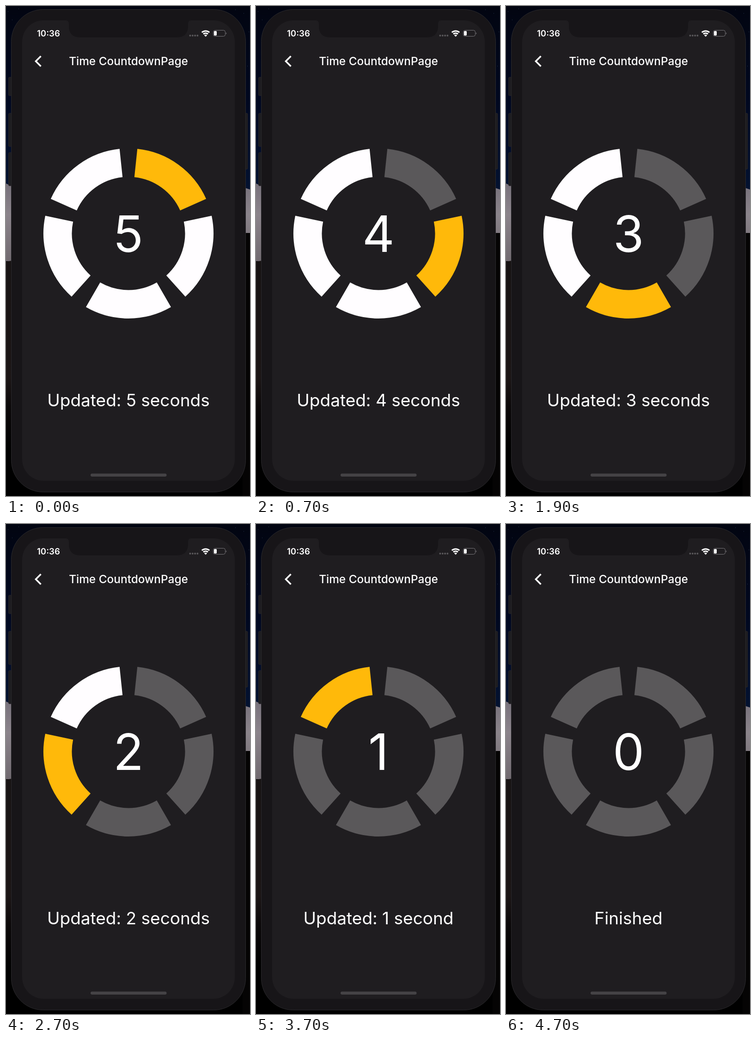
An HTML page that plays this animation: 528 px wide and 1060 px high, repeating every 5.7 s.

```html
<!DOCTYPE html>
<html lang="en">
<head>
<meta charset="utf-8">
<title>Countdown</title>
<style>
  html, body { margin: 0; width: 100%; height: 100%; overflow: hidden; background: #000; }
  svg { display: block; width: 528px; height: 1060px; }
  text { font-family: Inter, Roboto, sans-serif; fill: #fff; }
  .mid { text-anchor: middle; }
</style>
</head>
<body>
<svg viewBox="0 0 528 1060">
  <defs>
    <linearGradient id="sky" x2="0" y2="1">
      <stop stop-color="#020511"/><stop offset=".5" stop-color="#010820"/><stop offset="1" stop-color="#031231"/>
    </linearGradient>
    <linearGradient id="hill" x2="0" y2="1">
      <stop stop-color="#77717b"/><stop offset=".4" stop-color="#8b848b"/><stop offset="1" stop-color="#716a70"/>
    </linearGradient>
    <linearGradient id="ground" x2="0" y2="1">
      <stop stop-color="#171313"/><stop offset=".5" stop-color="#1b1515"/>
      <stop offset=".62" stop-color="#0b0809"/><stop offset=".8" stop-color="#000"/>
    </linearGradient>
  </defs>

  <!-- Wallpaper -->
  <rect width="528" height="400" fill="url(#sky)"/>
  <path d="M4 12h1M13 30h1M27 6h1M496 8h1M514 16h1M525 56h1M522 130h1" stroke="#33405c"/>
  <path d="M0 384L12 389L516 393L528 397V491H516L12 552H0Z" fill="url(#hill)"/>
  <path d="M0 553L12 551V1060H0Z" fill="url(#ground)"/>
  <path d="M512 491H528V1060H512Z" fill="#050404"/>

  <!-- Phone -->
  <g fill="#1d1c1f" stroke="#29282b" stroke-width=".8">
    <rect x="5.5" y="154" width="9" height="40" rx="2"/>
    <rect x="5.5" y="232" width="9" height="72" rx="2"/>
    <rect x="5.5" y="317" width="9" height="72" rx="2"/>
    <rect x="514" y="232" width="9" height="121" rx="2"/>
  </g>
  <rect x="11.5" y="7.5" width="507" height="1044" rx="69" fill="#171518" stroke="#2b2a2d"/>
  <rect x="35" y="31" width="460" height="996" rx="46" fill="#1f1d20"/>
  <path d="M129 30V31Q136 31 136 39V43Q136 68 161 68H369Q394 68 394 43V39Q394 31 401 31V30Z" fill="#171518"/>

  <!-- Status bar -->
  <text x="67" y="66" font-size="18.6" font-weight="600">10:36</text>
  <path d="M398.5 64h17" stroke="#59575a" stroke-width="4" stroke-linecap="round" stroke-dasharray="0 5.3"/>
  <g fill="none" stroke="#fff" stroke-width="3">
    <path d="M423.8 57.2A12 12 0 0 1 440.2 57.2"/>
    <path d="M427 60.7A7.3 7.3 0 0 1 437 60.7"/>
  </g>
  <path d="M432 66.5L428.8 63.2A4.6 4.6 0 0 1 435.2 63.2Z" fill="#fff"/>
  <rect x="448.5" y="52.5" width="26" height="13" rx="4" fill="none" stroke="#78767a"/>
  <rect x="450" y="54" width="6" height="10" rx="2" fill="#fff"/>
  <path d="M476 57Q478.5 59 476 61.5Z" fill="#78767a"/>

  <!-- Page -->
  <path d="M75.5 108.5L64.5 119.5L75.5 130.5" fill="none" stroke="#fff" stroke-width="3.6"/>
  <text class="mid" x="265" y="128" font-size="24.4" font-weight="500">Time CountdownPage</text>
  <g id="ring" fill="none" stroke-width="61.5"></g>
  <text id="digit" class="mid" x="265" y="532" font-size="108"></text>
  <text id="label" class="mid" x="265" y="866" font-size="37"></text>
  <rect x="183" y="1011.5" width="164.500" height="6.500" rx="3.25" fill="#454346"/>
</svg>
<script>
const LOOP = 5700, COUNT = 5, FIRST_TICK = 700;
const get = id => document.getElementById(id);
const ring = get('ring'), digit = get('digit'), label = get('label');

function point(degrees, radius = 153.25) {
  const a = degrees * Math.PI / 180;
  return `${265 + radius * Math.sin(a)} ${492 - radius * Math.cos(a)}`;
}

const segments = Array.from({ length: COUNT }, (_, i) => {
  const path = document.createElementNS('http://www.w3.org/2000/svg', 'path');
  const start = 6 + i * 72;
  path.setAttribute('d', `M${point(start)}A153.25 153.25 0 0 1 ${point(start + 60)}`);
  return ring.appendChild(path);
});

let shown = -1;
function show(left) {
  if (left === shown) return;
  shown = left;
  const active = COUNT - left;
  segments.forEach((path, i) => path.setAttribute('stroke',
    i < active ? '#5a585a' : i === active ? '#ffb90a' : '#fffdff'));
  digit.textContent = left;
  label.textContent = left ? `Updated: ${left} second${left > 1 ? 's' : ''}` : 'Finished';
}

function draw() {
  const t = performance.now() % LOOP;
  const ticks = Math.floor((t - FIRST_TICK) / 1000) + 1;
  show(Math.max(0, COUNT - ticks));
  requestAnimationFrame(draw);
}
draw();
</script>
</body>
</html>
```
